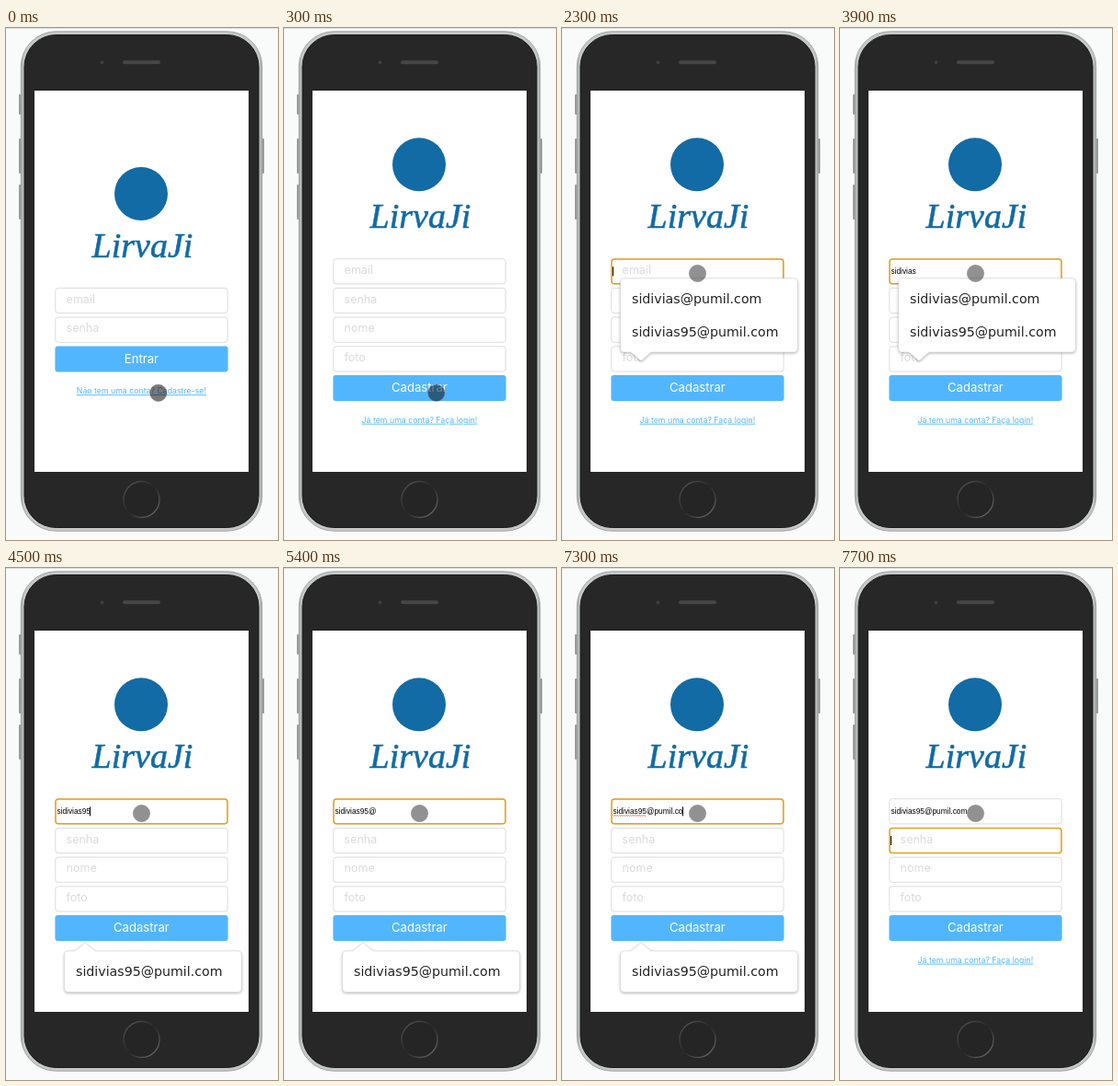
These frames come from a looping animation (296x556 px, 8000 ms). An HTML page:

```html
<!DOCTYPE html>
<html lang="pt-BR">
<head>
<meta charset="utf-8">
<title>Cadastro</title>
<style>
  html, body { margin: 0; width: 100%; height: 100%; overflow: hidden; background: #f9fbfa; }
  svg { display: block; width: 296px; height: 556px; }
  text { white-space: pre; }
  .ui { font-family: Inter, sans-serif; }
  .hint { font-size: 12.5px; fill: #dbdbdb; }
  .label { font-size: 13.1px; fill: #fff; text-anchor: middle; }
  .link { font-size: 8.75px; fill: #52b6ff; text-anchor: middle; text-decoration: underline; }
  .brand { font: italic 38px "Liberation Serif", serif; fill: #126ba5; stroke: #126ba5; stroke-width: .6; text-anchor: middle; }
  .typed { font: 8.33px "Liberation Sans", Arial, sans-serif; fill: #000; }
  .option { font: 14.2px "DejaVu Sans", sans-serif; fill: #222; }
  .box { fill: #fff; stroke: #d8d8d8; stroke-width: .9; }
  .popup path { fill: #fff; stroke: #d9d9d9; stroke-width: .6; filter: drop-shadow(0 1px 1.5px rgba(0,0,0,.3)); }
</style>
</head>
<body>
<svg viewBox="0 0 296 556">
  <defs>
    <linearGradient id="rim" x1="0" x2="1" y1="0" y2="0">
      <stop offset="0" stop-color="#a3a5a5"/>
      <stop offset=".012" stop-color="#c6c8c8"/>
      <stop offset=".988" stop-color="#c6c8c8"/>
      <stop offset="1" stop-color="#a3a5a5"/>
    </linearGradient>
    <linearGradient id="home" x1="0" x2="1" y1="0" y2="1">
      <stop offset="0" stop-color="#5a5a5a"/>
      <stop offset=".5" stop-color="#262626"/>
      <stop offset="1" stop-color="#777"/>
    </linearGradient>
  </defs>

  <rect width="296" height="556" fill="#f9fbfa"/>
  <rect width="296" height="1" fill="#dedfdf"/>
  <g fill="#999b9b">
    <rect x="14" y="72" width="3" height="22" rx="1"/>
    <rect x="14" y="120" width="3" height="38" rx="1"/>
    <rect x="14" y="170" width="3" height="38" rx="1"/>
    <rect x="278" y="120" width="3" height="38" rx="1"/>
  </g>
  <rect x="16.3" y="3.8" width="262.4" height="542.4" rx="38" fill="url(#rim)" stroke="#a2a4a4" stroke-width="1"/>
  <rect x="20" y="7.5" width="255" height="535" rx="34.5" fill="#272727" stroke="#1b1b1b" stroke-width="1"/>
  <circle cx="104.5" cy="37.5" r="2" fill="#3e3e3e"/>
  <rect x="127" y="35.2" width="41" height="4" rx="2" fill="#464646"/>
  <circle cx="147.5" cy="512" r="19.5" fill="#252525" stroke="url(#home)" stroke-width="1.3"/>
  <rect x="31" y="68" width="233" height="414" fill="#fff"/>

  <g id="login" class="ui"></g>
  <g id="signup" class="ui"></g>

  <rect id="ring" x="54" y="250.9" width="186.9" height="26.8" rx="3" fill="none" stroke="#e5a01c" stroke-width="1.5"/>
  <path id="squiggle" fill="none" stroke="#e83a3a" stroke-width=".7"/>
  <text id="typed" class="typed" x="55.4" y="267.3"></text>
  <rect id="caret" width="1" height="10" fill="#000"/>

  <g id="both" class="popup">
    <path d="M67.5 272H252.5Q256.3 272 256.3 276V348Q256.3 352 252.5 352H97L86 361.5L75 352H67.5Q63.7 352 63.7 348V276Q63.7 272 67.5 272Z"/>
    <text class="option" x="76" y="299">sidivias@pumil.com</text>
    <text class="option" x="76" y="335">sidivias95@pumil.com</text>
  </g>
  <g id="single" class="popup">
    <path d="M67.5 416H75L86 407L97 416H252.5Q256.3 416 256.3 420V456.5Q256.3 460.5 252.5 460.5H67.5Q63.7 460.5 63.7 456.5V420Q63.7 416 67.5 416Z"/>
    <text class="option" x="76" y="443">sidivias95@pumil.com</text>
  </g>

  <circle id="touch" r="9.2" stroke="#808080" stroke-opacity=".55" stroke-width=".8"/>
</svg>

<script>
const LOOP = 8000, ROW = 31.7, FIELD_X = 53.4, FIELD_W = 188.2;
const $ = id => document.getElementById(id);
const show = (id, on) => { $(id).style.display = on ? '' : 'none'; };

function buildForm(id, top, hints, action, link) {
  const field = (hint, i) => {
    const y = top + i * ROW;
    return `<rect class="box" x="${FIELD_X + .4}" y="${y + .4}" width="${FIELD_W - .8}" height="27.2" rx="3"/>
      <text class="hint" x="65.6" y="${y + 16.7}">${hint}</text>`;
  };
  const y = top + hints.length * ROW;
  $(id).innerHTML = `
    <circle cx="147" cy="${top - 102}" r="29" fill="#126ba5"/>
    <text class="brand" x="148.5" y="${top - 33.5}">LirvaJi</text>
    ${hints.map(field).join('')}
    <rect x="${FIELD_X}" y="${y}" width="${FIELD_W}" height="28" rx="3" fill="#52b6ff"/>
    <text class="label" x="147.4" y="${y + 18.2}">${action}</text>
    <text class="link" x="147.4" y="${y + 51.6}">${link}</text>`;
}
buildForm('login', 282, ['email', 'senha'], 'Entrar', 'Não tem uma conta? Cadastre-se!');
buildForm('signup', 250.3, ['email', 'senha', 'nome', 'foto'], 'Cadastrar', 'Já tem uma conta? Faça login!');

const EMAIL = 'sidivias95@pumil.com';
const start = { signup: false, press: .53, touch: true, focus: -1, caret: false, chars: 0, popup: '', fade: 1, spell: false };
const key = chars => ({ chars, caret: true });

// Each entry lists what changes at that time, in ms.
const steps = [
  [200, { signup: true }], [300, { press: .5 }], [700, { press: .43 }],
  [1400, { focus: 0, caret: true, popup: 'both' }], [1900, { caret: false }], [2300, { caret: true }],
  [2500, key(1)], [2600, key(2)], [2700, key(3)],
  [2900, key(4)], [3000, key(5)], [3100, key(6)],
  [3300, key(7)], [3400, key(8)], [3900, { caret: false }],
  [4400, key(9)], [4500, { ...key(10), popup: 'single' }],
  [4700, { touch: false }], [4900, key(11)], [5000, { touch: true }],
  [5400, { caret: false }], [5900, { caret: true, spell: true }],
  [6300, key(12)], [6400, key(13)], [6600, key(14)], [6700, key(15)], [6900, key(16)],
  [7100, key(17)], [7200, key(18)], [7300, key(19)], [7400, key(20)],
  [7500, { fade: .5 }], [7600, { popup: '' }], [7700, { focus: 1, spell: false }]
];

function stateAt(t) {
  return Object.assign({}, start, ...steps.filter(s => s[0] <= t).map(s => s[1]));
}

function touchAt(t) {
  const p = Math.min(1, Math.max(0, Math.floor((t - 600) / 100) / 6));
  const e = p * p * (3 - 2 * p);
  return [165.8 - 18.3 * e, 396.3 - 129.8 * e];
}

function zigzag(x, end, y) {
  let d = `M${x} ${y}`;
  for (let i = 1; x + i * 1.2 <= end; i++) d += `L${x + i * 1.2} ${y + (i % 2 ? 1 : 0)}`;
  return d;
}

function render(t) {
  const s = stateAt(t), typed = $('typed');
  show('login', !s.signup);
  show('signup', s.signup);
  typed.textContent = EMAIL.slice(0, s.chars);
  $('signup').querySelector('.hint').style.display = s.chars ? 'none' : '';

  show('ring', s.focus >= 0);
  $('ring').setAttribute('y', 250.9 + s.focus * ROW);
  const width = s.focus === 0 && s.chars ? typed.getComputedTextLength() : 0;
  show('caret', s.caret);
  $('caret').setAttribute('x', Math.round(54.7 + width));
  $('caret').setAttribute('y', 259.3 + Math.max(0, s.focus) * ROW);

  show('squiggle', s.spell);
  if (s.spell) $('squiggle').setAttribute('d', zigzag(55.4, 55.4 + typed.getSubStringLength(0, 10), 268.4));

  for (const id of ['both', 'single']) {
    show(id, s.popup === id);
    $(id).style.opacity = s.fade;
  }

  const [x, y] = touchAt(t);
  show('touch', s.touch);
  $('touch').setAttribute('cx', x);
  $('touch').setAttribute('cy', y);
  $('touch').setAttribute('fill-opacity', s.press);
}

const began = performance.now();
function tick() {
  render((performance.now() - began) % LOOP);
  requestAnimationFrame(tick);
}
tick();
</script>
</body>
</html>
```
